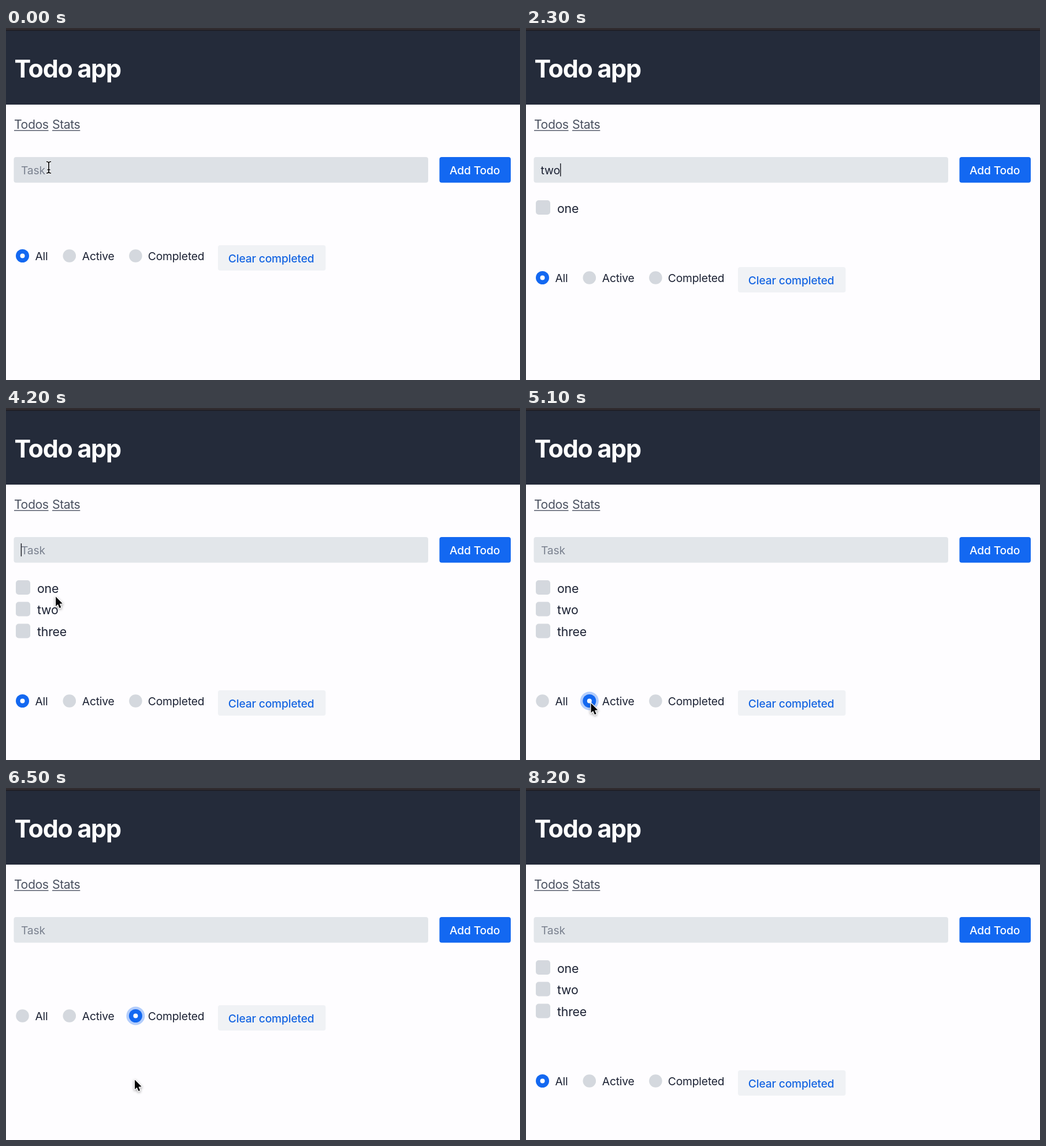
Write an HTML page with a canvas that moves like this. It is 890 px wide and 611 px high and loops after 8500 ms.

```html
<!DOCTYPE html>
<html lang="en">
<head>
<meta charset="utf-8">
<title>Todo app</title>
<style>
  html, body { margin: 0; width: 100%; height: 100%; overflow: hidden; background: #fefdff; }
  canvas { display: block; }
</style>
</head>
<body>
<canvas id="stage" width="890" height="611"></canvas>
<script>
const ctx = document.getElementById('stage').getContext('2d');
const LOOP = 8500, STEP = 100, ROW = 37.7;
const BLUE = '#1368f1', INK = '#1b2133', GREY = '#d4d8de';

// [time, text in the field, number of todos]
const TYPING = [
  [0, '', 0], [700, 'o', 0], [900, 'on', 0], [1100, 'one', 0], [1400, '', 1],
  [1700, 't', 1], [2000, 'tw', 1], [2300, 'two', 1], [2600, '', 2],
  [2800, 't', 2], [2900, 'th', 2], [3000, 'thr', 2], [3200, 'thre', 2],
  [3300, 'three', 2], [3600, '', 3]
];
const TODOS = ['one', 'two', 'three'];
// [time, index of the chosen filter]
const CLICKS = [[5000, 1], [6300, 2], [7300, 0]];
// [start, end, x, y]
const MOVES = [[0, 0, 74, 242], [3900, 4700, 112.5, 512.5], [5400, 6000, 223, 506.5], [6500, 7000, 34, 401.5]];
const RADIOS = [
  { x: 28.5, label: 'All', tx: 50.5 },
  { x: 109.8, label: 'Active', tx: 131.8 },
  { x: 224.4, label: 'Completed', tx: 245.8 }
];

const lastBefore = (list, t) => list.filter(e => e[0] <= t).pop();

function box(x, y, w, h, r, fill) {
  ctx.fillStyle = fill;
  ctx.beginPath();
  ctx.roundRect(x, y, w, h, r);
  ctx.fill();
}

function disc(x, y, r, fill) {
  ctx.fillStyle = fill;
  ctx.beginPath();
  ctx.arc(x, y, r, 0, Math.PI * 2);
  ctx.fill();
}

function text(s, x, y, size, fill, weight = 400, track = -0.01) {
  ctx.font = `${weight} ${size}px Inter, "Liberation Sans", sans-serif`;
  ctx.letterSpacing = `${size * track}px`;
  ctx.fillStyle = fill;
  ctx.fillText(s, x, y);
  return ctx.measureText(s).width;
}

function link(s, x) {
  const w = text(s, x, 175, 21.3, '#4b5261', 400, -0.022);
  ctx.fillRect(x, 177.2, w, 1.4);
}

function pointerAt(t) {
  let [, , x, y] = MOVES[0];
  for (const [from, to, nx, ny] of MOVES.slice(1)) {
    const k = Math.min(1, Math.max(0, (t - from) / (to - from)));
    const e = k * k * (3 - 2 * k);
    x += (nx - x) * e;
    y += (ny - y) * e;
  }
  return { x, y, shown: t < 700 || (t >= 3800 && t < 8100) };
}

function beam(x, y) {
  ctx.beginPath();
  for (const s of [-1, 1]) {
    ctx.moveTo(x - 4, y + s * 10);
    ctx.quadraticCurveTo(x, y + s * 10, x, y + s * 7);
    ctx.quadraticCurveTo(x, y + s * 10, x + 4, y + s * 10);
  }
  ctx.moveTo(x, y - 8);
  ctx.lineTo(x, y + 8);
  ctx.moveTo(x - 2.5, y + 4);
  ctx.lineTo(x + 2.5, y + 4);
  for (const [w, c] of [[3.6, 'rgba(255,255,255,.85)'], [1.7, '#0b0b0d']]) {
    ctx.lineWidth = w;
    ctx.strokeStyle = c;
    ctx.stroke();
  }
}

function arrow(x, y) {
  const pts = [[0, 0], [0, 16.6], [3.7, 13.2], [6.4, 19.6], [9.2, 18.4], [6.5, 12.2], [11.7, 11.8]];
  ctx.save();
  ctx.translate(x, y);
  ctx.beginPath();
  pts.forEach(p => ctx.lineTo(...p));
  ctx.closePath();
  ctx.lineJoin = 'round';
  ctx.lineWidth = 2.6;
  ctx.strokeStyle = '#fff';
  ctx.shadowColor = 'rgba(0,0,0,.4)';
  ctx.shadowBlur = 4;
  ctx.shadowOffsetY = 1.5;
  ctx.stroke();
  ctx.shadowColor = 'transparent';
  ctx.fillStyle = '#050507';
  ctx.fill();
  ctx.restore();
}

function header() {
  ctx.fillStyle = '#fefdff';
  ctx.fillRect(0, 0, 890, 611);
  ctx.fillStyle = '#242b3a';
  ctx.fillRect(0, 0, 890, 133);
  ctx.fillStyle = '#302b2f';
  ctx.fillRect(0, 0, 890, 4);
  ctx.fillStyle = '#1c1d24';
  ctx.fillRect(0, 3.5, 890, 1.5);
  text('Todo app', 14.5, 85.5, 43, '#fff', 700, -0.03);
  link('Todos', 14);
  link('Stats', 80);
}

function field(value, t) {
  const focused = t >= 100 && t < 5000;
  box(13.5, 224, 717.5, 44.5, 4, t < 200 ? '#dde1e6' : '#e2e6ea');
  let end = 0;
  if (value) end = text(value, 25.6, 254, 19.5, INK);
  else text('Task', 26, 254, 19.3, '#7b8290');
  if (focused) {
    ctx.fillStyle = '#15171f';
    ctx.fillRect(25.7 + end, 235, 1.4, 22.5);
  }
  box(750.5, 224, 123.5, 44.5, 4, BLUE);
  text('Add Todo', 768, 254, 19.3, '#fff', 500);
}

function todoList(n) {
  for (let i = 0; i < n; i++) {
    const y = Math.round(i * ROW * 2) / 2;
    box(17, 299 + y, 25, 25, 5, GREY);
    text(TODOS[i], 54, 320.5 + y, 21.3, INK);
  }
}

function filters(dy, chosen, click, t, mouse) {
  const y = 395.5 + dy;
  RADIOS.forEach(({ x, label, tx }, i) => {
    const over = mouse.shown && Math.hypot(mouse.x - x, mouse.y - y) < 12;
    if (i === chosen) {
      const ring = click ? Math.min(1, 1 - (t - click[0] - 200) / 200) : 0;
      if (ring > 0) disc(x, y, 16, `rgba(19,104,241,${0.32 * ring})`);
      disc(x, y, 11.5, BLUE);
      disc(x, y, 4, '#fff');
    } else {
      disc(x, y, over ? 10 : 11.3, over ? '#b9bfcb' : GREY);
    }
    text(label, tx, 403 + dy, 19.3, INK);
  });
  box(367, 377 + dy, 186.5, 44, 4, '#f0f2f5');
  text('Clear completed', 384.8, 406.5 + dy, 19.3, '#1565e2', 500);
}

function draw(t) {
  const [, value, count] = lastBefore(TYPING, t);
  const click = lastBefore(CLICKS, t);
  const chosen = click ? click[1] : 0;
  const rows = chosen === 2 ? 0 : count;
  const mouse = pointerAt(t);
  header();
  field(value, t);
  todoList(rows);
  filters(Math.round(rows * ROW), chosen, click, t, mouse);
  if (mouse.shown) (mouse.y < 268 ? beam : arrow)(mouse.x, mouse.y);
}

const start = performance.now();
function tick() {
  const t = (performance.now() - start) % LOOP;
  draw(Math.floor(t / STEP) * STEP);
  requestAnimationFrame(tick);
}
tick();
</script>
</body>
</html>
```
